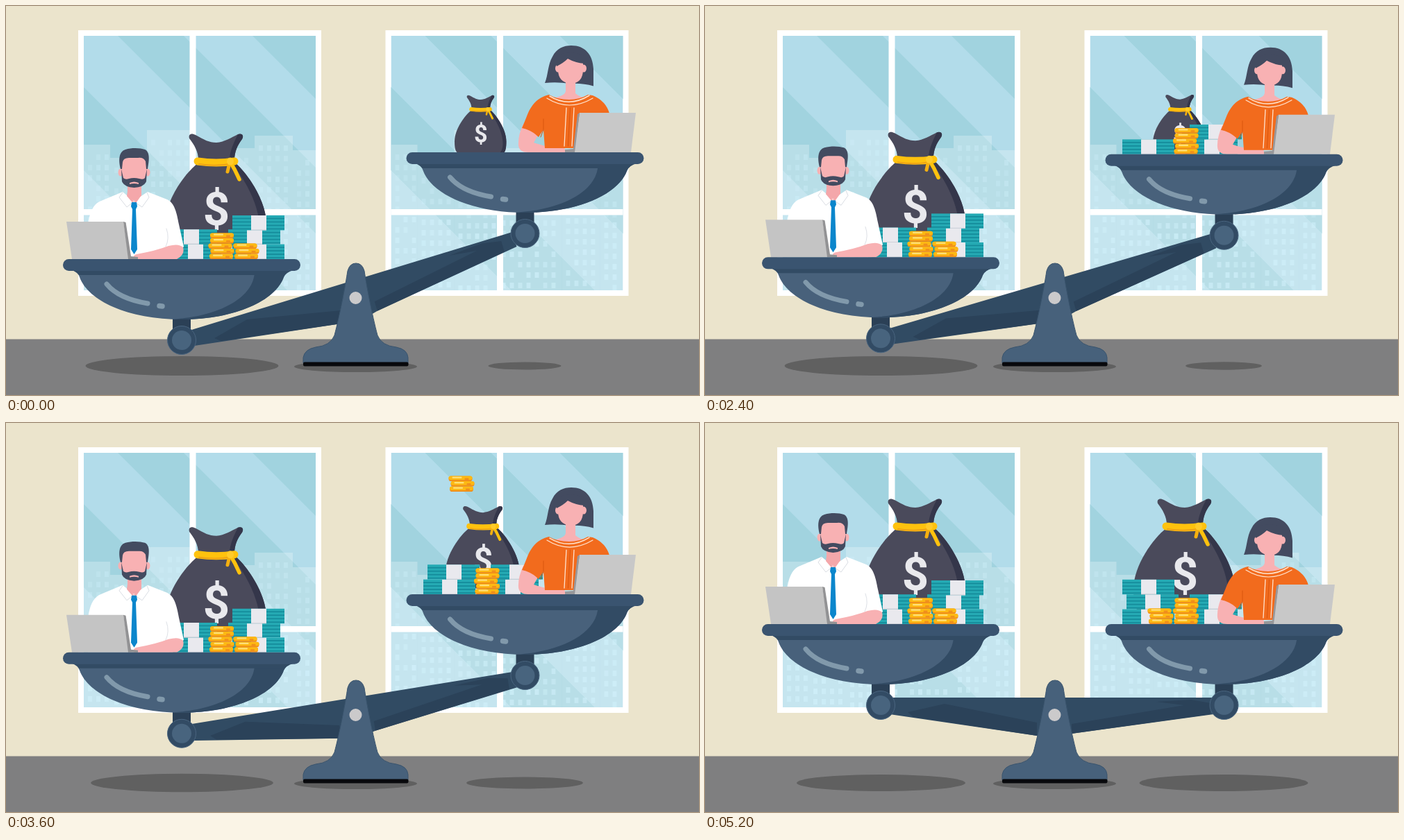
Recreate the animation shown at these times as an HTML page. Size 998 by 561 pixels, loop 6600 ms.

```html
<!DOCTYPE html>
<html lang="en">
<head>
<meta charset="utf-8">
<title>Balancing the scale</title>
<style>
html, body { margin: 0; width: 100%; height: 100%; overflow: hidden; background: #ebe4cc; }
svg { display: block; width: 998px; height: 561px; }
text { font-family: Roboto, "Open Sans", sans-serif; font-weight: 700; }
</style>
</head>
<body>
<svg id="stage" viewBox="0 0 998 561" xmlns="http://www.w3.org/2000/svg"></svg>
<script>
const LOOP = 6600, STEP = 100;
const TILT_START = 2300, TILT_TIME = 2850, TILT_ANGLE = 17;
const DROP_L = 75, LIFT_R = 79;
const INK = '#434b60', SKIN = '#f8b1b3';

let seed = 7;
const rnd = () => (seed = (seed * 16807) % 2147483647) / 2147483647;

const rect = (x, y, w, h, fill, extra = '') =>
  `<rect x="${x}" y="${y}" width="${w}" height="${h}" fill="${fill}" ${extra}/>`;
const path = (d, fill, extra = '') => `<path d="${d}" fill="${fill}" ${extra}/>`;
const line = (d, color, width) =>
  path(d, 'none', `stroke="${color}" stroke-width="${width}" stroke-linecap="round" stroke-linejoin="round"`);
const oval = (cx, cy, rx, ry, fill, extra = '') =>
  `<ellipse cx="${cx}" cy="${cy}" rx="${rx}" ry="${ry}" fill="${fill}" ${extra}/>`;

// Window scenery, drawn for the left window and shifted for the right one
function building(x, y, w) {
  let s = rect(x, y, w, 411 - y, '#fff', 'opacity=".24"');
  for (let wy = y + 14; wy < 404; wy += 15)
    for (let wx = x + 6; wx < x + w - 6; wx += 12)
      if (rnd() > .2)
        s += rect(wx, wy, 6, 8, '#d3f3fd', `opacity="${(wy > 300 ? .62 : .3) * (.6 + .4 * rnd())}"`);
  return s;
}

function band(from, to) {
  const x = c => c + 43;
  return path(`M${x(from)} 43H${x(to)}L${x(to) + 367} 410H${x(from) + 367}Z`, '#a1d3df');
}

function windowPane(dx) {
  const city = [[112, 200, 38], [150, 219, 53], [203, 179, 62], [265, 205, 93], [358, 187, 55], [413, 208, 34]];
  return `<g transform="translate(${dx})">` +
    rect(104, 35, 350, 383, '#fff') +
    '<g clip-path="url(#glass)">' +
    rect(112, 43, 334, 367, '#b2dcea') +
    band(-125, -5) + band(118, 213) + band(312, 480) +
    city.map(b => building(...b)).join('') +
    '</g>' +
    rect(264.5, 43, 9, 367, '#fff') + rect(112, 293, 334, 8.5, '#fff') + '</g>';
}

function bundle(x, y) {
  let s = rect(x, y, 75, 21.4, '#25aab4');
  for (let i = 0; i < 4; i++) s += rect(x, y + 3.6 + i * 5, 75, 1.7, '#148b9a');
  s += rect(x + 27, y, 22, 21.4, '#e9e9ee');
  return s + rect(x + 27, y + 20.4, 22, 1, '#cfd0d8');
}

function coins(cx, count) {
  const shift = [0, 1.5, -1.5, 1, 1], h = 7.5;
  let s = '';
  for (let i = 0; i < count; i++) {
    const x = cx - 17 + shift[i], y = 290 - (i + 1) * h;
    s += rect(x, y, 34, h, '#f08f1c', 'rx="3.6"') +
      rect(x, y, 34, 5.4, '#fdb913', 'rx="2.7"') +
      rect(x + 5, y + 1, 14, 2.2, '#ffe07a', 'rx="1"') +
      rect(x + 23, y + 3, 6, 2.4, '#f08f1c', 'rx="1"');
  }
  return s;
}

const bag =
  path('M276 152C258 166 229 205 229 240C229 258 231 267 236 271H369C373 267 375 258 375 240C375 205 347 166 331 152Z', '#4a4a5b') +
  path('M325 152H331C347 166 375 205 375 240C375 258 373 267 369 271H358C364 264 366 252 365 240C363 208 342 172 325 152Z', '#34364a') +
  path('M264 116C262 109 268 108 273 111C286 118 292 122 303 122C315 121 324 115 334 110C340 108 343 112 340 117C333 126 329 136 329 147H277C277 135 271 125 264 116Z', '#4a4a5b') +
  path('M334 110C340 108 343 112 340 117C333 126 329 136 329 147H322C322 134 329 120 334 110Z', '#34364a') +
  line('M276 149Q303 153 329 149', '#ffc20e', 11) +
  line('M278 153Q303 157 326 152', '#efa315', 2) +
  line('M323 150Q330 161 336 175', '#ffc20e', 5.5) +
  line('M322 151L319 164', '#f5b010', 5) +
  oval(323, 149, 5, 5.5, '#ffcb2b') +
  '<text x="303" y="241" font-size="67" text-anchor="middle" fill="#e9e9ed">$</text>';

const pan =
  rect(240, 374, 26, 24, '#2b4056') +
  path('M93 305Q104 309 106 316C118 350 176 377 253 377C330 377 388 350 400 316Q403 309 414 305Z', '#48617b') +
  path('M358 306H414Q403 309 400 316C388 350 330 377 253 377L240 376.500C300 374 359 348 358 306Z', '#324b64') +
  path('M93 305H414Q404 308 401 313H105Q102 308 93 305Z', '#324b64') +
  rect(82, 290, 342, 17, '#3a5470', 'rx="8.500"') +
  line('M145 326Q162 347 204 354', '#8199ab', 7) +
  line('M221 357.500L225 358', '#8199ab', 7.500) +
  oval(253, 407, 20.5, 20.5, '#324b64', 'stroke="#4a657f" stroke-width="1"') +
  oval(253, 407, 14, 14, '#48647e');

const man =
  path('M175 178H195V202L185 212L175 202Z', '#f4a7aa') +
  path('M117 250C119 226 124 211 137 206L168 193L184 206L204 193L232 204C243 209 246 224 249 240L256 272L240 290H118Z', '#fff') +
  path('M175 192L184 207L195 192V198L185 212L174 199Z', '#f4a7aa') +
  line('M168 194L163 201L174 215L184 207L196 215L206 201L203 194', '#d9dde3', 1) +
  line('M231 246Q236 260 230 272', '#dde0e6', 1) +
  path('M181 208H188L189 214L187 218L189 276L184.500 283L180 276L182 218L180 214Z', '#0b86cc') +
  oval(165, 165, 3.5, 5.5, SKIN) + oval(204, 165, 3.5, 5.5, SKIN) +
  path('M167 142H202V172Q202 185 184.500 185Q167 185 167 172Z', SKIN) +
  path('M165 160C162 148 162 135 172 132C182 129 194 130 200 132C208 136 206 148 204 160H202L201 149Q198 143 190 144H177Q169 144 168 150L167 160Z', INK) +
  path('M166 160L169 173Q172 176 177 174Q184 172 192 174Q198 176 200 173L203 160L202 178Q199 186 184.500 187Q170 186 167 178Z', INK) +
  path('M178 182V180Q184.500 177 191 180V182Q184.500 180 178 182Z', SKIN) +
  path('M188 283Q216 278 234 271Q249 267 255 273Q258 284 246 290H184Q182 285 188 283Z', SKIN) +
  path('M87 236H169L177 290H95Z', '#c4c4c4') +
  path('M169 236L172.500 237L180 286L190 287V290H176Z', '#929294');

const woman =
  path('M776 190C781 178 780 164 787 152C793 140 803 136 814 136C834 136 845 149 846 170L846 194.500Q830 190 813 191Q793 188 776 190Z', INK) +
  path('M806 184H820V205Q826 210 832 211L813 222L792 211Q805 208 806 202Z', SKIN) +
  path('M745 249Q737 266 738 280Q739 290 752 290H806L804 283Q783 284 760 276L768 262Z', SKIN) +
  path('M782 207C764 211 755 224 750 238Q746 248 743 255Q757 258 767 268L774 257L776 284H848L869 234Q864 216 845 208L838 207Q826 214 811 214Q794 214 782 207Z', '#f26b1d') +
  line('M783 209Q811 226 840 208', '#ffe3cf', 1.5) +
  line('M779 212Q811 232 845 212', '#ffe3cf', 1.2) +
  line('M807 226L804 281M818 226L815 281', '#ffe3cf', 1.3) +
  line('M812.500 226L809.500 281', '#d8560f', 1) +
  line('M774 242L774 257L770 268', '#d8560f', 1) +
  oval(795, 169, 4, 5.5, SKIN) + oval(832, 169, 4, 5.5, SKIN) +
  path('M795 158Q814 149 831 158V171Q831 190 813 191Q795 189 795 171Z', SKIN) +
  path('M793 166Q803 161 809 155Q820 161 833 162V151Q813 141 793 151Z', INK) +
  path('M826 233H907L900 290H818Z', '#c8c8c8') +
  path('M826 233L823 235L817 285L805 286V290H819Z', '#97979a');

const cashL = [[235, 268.6], [229, 247.2], [326, 268.6], [320, 247.2], [326, 227]]
  .map(b => bundle(...b)).join('') + coins(310, 5) + coins(346, 3);

// zero: moment at which the top of the piece passes y = 0; v: px per ms
const drops = [
  { top: 268.6, zero: 1035, v: .665, art: bundle(601, 268.6) + bundle(692, 268.6) },
  { top: 247.2, zero: 1613, v: .75, art: bundle(698, 247.2) },
  { top: 247.2, zero: 3037, v: .91, art: bundle(607, 247.2) },
  { top: 225.8, zero: 4540, v: .91, art: bundle(601, 225.8) },
  { top: 252.5, zero: 1940, v: .75, art: coins(692.5, 5) },
  { top: 267.5, zero: 3510, v: .85, art: coins(656, 3) }
];

const beam =
  path('M253 396H747V418L528 448L503 454L478 451L253 418Z', '#314b63') +
  path('M292 417L345 405L478 432V451L300 424Z', '#2b4259') +
  path('M528 434L690 407L650 402L700 399L728 404V420L528 448Z', '#2b4259');

const post =
  path('M428 515V507Q430 495 446 492Q467 490 473 475C481 445 489 402 492 382Q495 371 504 371Q513 371 516 382C519 402 527 445 535 475Q541 490 562 492Q578 495 579 507V515Z',
    '#47617b', 'stroke="#3a546d" stroke-width="1"') +
  rect(428, 513.500, 151.500, 6, '#08090c', 'rx="2"') +
  oval(503.500, 421, 9, 9, '#cbcacb');

const stage = document.getElementById('stage');
stage.innerHTML =
  '<clipPath id="glass"><rect x="112" y="43" width="334" height="367"/></clipPath>' +
  rect(0, 0, 998, 561, '#ebe4cc') +
  windowPane(0) + windowPane(442.5) +
  rect(0, 480.5, 998, 81, '#7f7f80') +
  oval(253.5, 519, 139, 14, '#606060', 'id="shadeL"') +
  oval(747, 519, 52.5, 5.5, '#606060', 'id="shadeR"') +
  oval(503.5, 520, 88.5, 8, '#606060') +
  `<g id="beam">${beam}</g>` + post +
  `<g id="left">${bag}${cashL}${man}${pan}</g>` +
  `<g id="right"><g id="bagR">${bag}</g>` +
  drops.map((d, i) => `<g id="drop${i}">${d.art}</g>`).join('') +
  woman + `<g transform="translate(494.5)">${pan}</g></g>`;

const $ = id => document.getElementById(id);
const move = (id, value) => $(id).setAttribute('transform', value);
const mix = (a, b, k) => a + (b - a) * k;

function shade(id, rx, ry) {
  $(id).setAttribute('rx', rx);
  $(id).setAttribute('ry', ry);
}

function draw(t) {
  const p = Math.min(1, Math.max(0, (t - TILT_START) / TILT_TIME));
  const soft = p * p * (3 - 2 * p);
  const dl = DROP_L * (1 - p), dr = -LIFT_R * (1 - p);

  move('left', `translate(0 ${dl})`);
  move('right', `translate(0 ${dr})`);
  move('beam', `rotate(${-TILT_ANGLE * (1 - p)} 503.5 421)`);

  const size = mix(.51, 1, p);
  move('bagR', `translate(${mix(683.5, 690.5, p)} ${mix(208, 110, p)}) scale(${size}) translate(-302.5 -110)`);

  drops.forEach((d, i) => {
    const y = Math.min(d.top, (t - d.zero) * d.v - dr);
    move('drop' + i, `translate(0 ${y - d.top})`);
  });

  shade('shadeL', mix(139, 121.5, soft), mix(14, 12, soft));
  shade('shadeR', mix(52.5, 121.5, p), mix(5.5, 12, p));
}

function tick() {
  const t = performance.now() % LOOP;
  draw(Math.floor(t / STEP) * STEP);
  requestAnimationFrame(tick);
}
tick();
</script>
</body>
</html>
```
